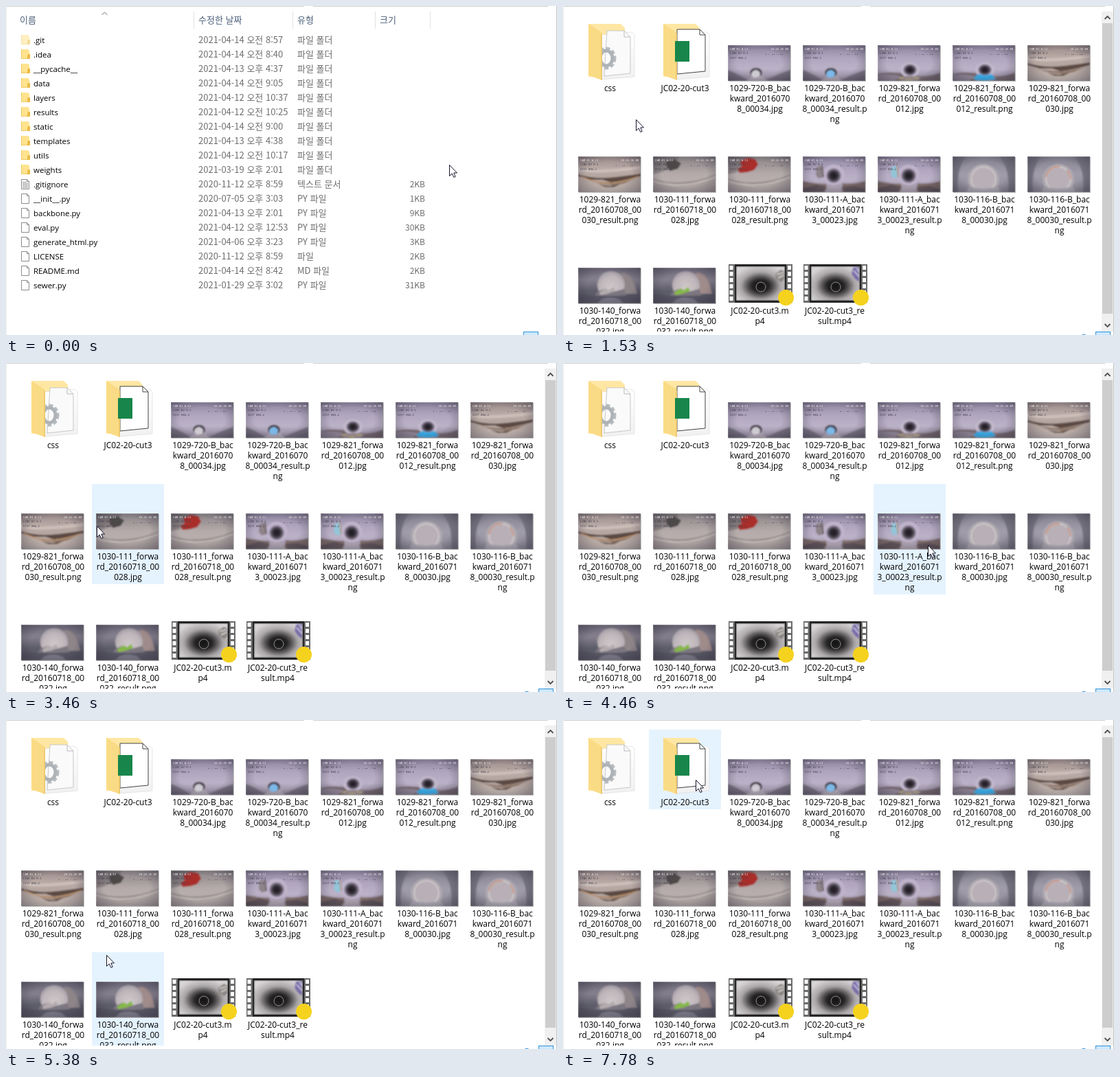
Recreate the animation shown at these times as an HTML page. Size 802 px wide and 479 px high, loop 8000 ms.

```html
<!DOCTYPE html>
<html lang="ko">
<head>
<meta charset="utf-8">
<title>File explorer</title>
<style>
  html, body { margin: 0; width: 100%; height: 100%; overflow: hidden; background: #fff; }
  #stage { display: block; width: 100vw; height: 100vh; }
  text { white-space: pre; }
  .name { font: 11.5px "Open Sans", "Noto Sans", sans-serif; }
  .label { font: 12px "Open Sans", "Noto Sans", sans-serif; text-anchor: middle; }
  .cell { font: 13px "Noto Sans CJK KR", "Noto Sans CJK", sans-serif; fill: #6d6d6d; }
  .head { fill: #4c607a; }
  .size { font-size: 12px; text-anchor: end; }
  .osd { font: 4px "Noto Sans Mono", monospace; }
</style>
</head>
<body>
<svg id="stage" viewBox="0 0 802 479"></svg>
<script>
const LOOP = 8000, TICK = 76.9;
const stage = document.getElementById('stage');

// ---- small markup helpers ----
const rect = (x, y, w, h, fill, extra = '') =>
  `<rect x="${x}" y="${y}" width="${w}" height="${h}" fill="${fill}" ${extra}/>`;
const path = (d, fill, extra = '') => `<path d="${d}" fill="${fill}" ${extra}/>`;
const line = (d, stroke, width = 1) => path(d, 'none', `stroke="${stroke}" stroke-width="${width}"`);
const oval = (x, y, rx, ry, fill, extra = '') =>
  `<ellipse cx="${x}" cy="${y}" rx="${rx}" ry="${ry}" fill="${fill}" ${extra}/>`;
const text = (x, y, cls, s, extra = '') => `<text x="${x}" y="${y}" class="${cls}" ${extra}>${s}</text>`;
const at = (x, y, body) => `<g transform="translate(${x} ${y})">${body}</g>`;
const radial = (id, cx, cy, r, stops) =>
  `<radialGradient id="${id}" cx="${cx}" cy="${cy}" r="${r}">${stops.map(([o, c]) =>
    `<stop offset="${o}" stop-color="${c}"/>`).join('')}</radialGradient>`;
const linear = (id, ...colors) =>
  `<linearGradient id="${id}" x2="0" y2="1">${colors.map((c, i) =>
    `<stop offset="${i / (colors.length - 1)}" stop-color="${c}"/>`).join('')}</linearGradient>`;

const defs = '<defs>' +
  linear('lilac', '#8c839d', '#aea4bd', '#bcb2c8', '#8a8194') +
  linear('sand', '#998a88', '#baaaa6', '#b3a5a0', '#c2b6b0') +
  linear('clay', '#8a8386', '#b5abaa', '#bcb2b1') +
  linear('stone', '#84818f', '#a19dab', '#8d8a97') +
  linear('dusk', '#6f6a7a', '#85808d', '#5c5b68', '#666573') +
  linear('page', '#ffffff', '#f1f1f1') +
  radial('shade', .5, .5, .72, [[.5, '#2d293800'], [1, '#2d293880']]) +
  radial('hole', .5, .5, .5, [[0, '#1d1a20'], [.5, '#332e37'], [.8, '#6c6474'], [1, '#a79db3']]) +
  radial('mouth', .5, .6, .6, [[0, '#d0c9ca'], [.7, '#bdb5b9'], [1, '#a19aa3']]) +
  radial('pipe', .5, .57, .62, [[0, '#151515'], [.28, '#242324'], [.45, '#5d5a5c'], [.65, '#aaa6a8'], [1, '#d9d6d8']]) +
  '<filter id="soft" x="0" y="0" width="1" height="1"><feGaussianBlur stdDeviation=".8"/></filter></defs>';

// ---- list view ----
const files = `.git|04-14 오전 8:57
.idea|04-14 오전 8:40
__pycache__|04-13 오후 4:37
data|04-14 오전 9:05
layers|04-12 오전 10:37
results|04-12 오전 10:25
static|04-14 오전 9:00
templates|04-13 오후 4:38
utils|04-12 오전 10:17
weights|03-19 오후 2:01
.gitignore|2020-11-12 오후 8:59|텍스트 문서|2KB
__init__.py|2020-07-05 오후 3:03|PY 파일|1KB
backbone.py|04-13 오후 2:01|PY 파일|9KB
eval.py|04-12 오후 12:53|PY 파일|30KB
generate_html.py|04-06 오후 3:23|PY 파일|3KB
LICENSE|2020-11-12 오후 8:59|파일|2KB
README.md|04-14 오전 8:42|MD 파일|2KB
sewer.py|01-29 오후 3:02|PY 파일|31KB`.split('\n').map(row => row.split('|'));

const smallFolder = path('M0 0H10L12 2V14H0Z', '#ffe38f') + path('M0 0H1V14H0ZM0 13H12V14H0Z', '#efc964') +
  path('M10 7H13V14H9V10Z', '#eabb45');
const smallPage = path('M.5 .5H8.5L11.5 3.5V14.5H.5Z', '#fff', 'stroke="#8c8c8c"') +
  line('M8.5 .5V3.5H11.5', '#8c8c8c');
const pageLines = line('M2 4.5H8M2 6.5H10M2 8.5H10M2 10.5H10M2 12.5H10', '#999');

const fileRow = ([name, date, type, size], i) => {
  const y = 39 + 21 * i;
  const icon = !type ? smallFolder : smallPage + (name === '.gitignore' ? pageLines : '');
  return `<g ${i ? '' : 'opacity=".55"'}>${at(22, y + 3, icon)}</g>` +
    text(40, y + 15, 'name', name) +
    text(280, y + 15, 'cell', date.startsWith('2020') ? date : '2021-' + date) +
    text(424, y + 15, 'cell', type || '파일 폴더') +
    text(610, y + 15, 'cell size', size || '');
};
const headings = [[20, '이름'], [280, '수정한 날짜'], [424, '유형'], [544, '크기']];
const listView = headings.map(([x, s]) => text(x, 25, 'cell head', s)).join('') +
  [273, 417, 537, 617].map(x => rect(x, 8, 1, 25, '#e2e2e2')).join('') +
  line('M139.5 13L143.5 9L147.5 13', '#6d6d6d') +
  files.map(fileRow).join('') +
  rect(753.5, 474.5, 21, 8, '#cce8ff', 'stroke="#3192d6"');

// ---- thumbnails, drawn in a 91 x 52 box ----
const osd = text(3, 7, 'osd', 'CAM 01 A:12', 'fill="#eee"') + text(62, 7, 'osd', '10:24:36 08', 'fill="#eee"') +
  `<g fill="#47424f">${text(3, 13, 'osd', 'LINE 02 B:3')}${text(3, 20, 'osd', 'DIST 004-2')}
  ${text(54, 15, 'osd', '▪ ◦ ▪▪ ◦ ▪▪')}</g>`;

const scenes = {
  debris: marked => rect(0, 0, 91, 52, 'url(#lilac)') +
    path('M0 36Q16 42 30 52H0ZM91 36Q70 43 54 52H91Z', '#5d5967', 'opacity=".6"') +
    path('M27 52Q34 42 50 44L56 52Z', '#aaa1ae') +
    oval(41, 40, 9, 7, '#4a4550') +
    path('M34 44Q34 37 41 36Q49 38 46 46L38 48Z', marked ? '#7db9e8' : '#cfcbd3'),
  silt: marked => rect(0, 0, 91, 52, 'url(#lilac)') +
    path('M0 42Q22 37 46 43T91 40V52H0Z', '#75676e') +
    path('M0 43Q20 41 34 46L24 52H0Z', '#928798') +
    oval(47, 36, 14, 11, '#c3b9cd') + oval(47, 36, 10, 8.5, 'url(#hole)') +
    path('M32 47Q46 42 64 47L58 52H34Z', '#978a90') +
    line('M30 49L38 47M52 48L60 48M40 50H50', '#bfae72', 1.5) +
    (marked ? path('M30 48L38 42L48 44L57 42L63 50L46 52L34 51Z', '#37a7e0') : ''),
  crack: marked => rect(0, 0, 91, 52, 'url(#sand)') +
    line('M0 19Q30 25 91 16', '#cdc0ba', 4) +
    path('M0 26Q22 33 44 31T91 25V29Q66 36 48 38L36 34L18 34L0 29Z', '#5c4a43') +
    path('M14 34Q30 38 46 38T82 32L68 39L52 42L32 40Z', '#8d7567') +
    path('M30 41L46 43L62 40L52 45L40 45Z', '#66544c') +
    (marked ? line('M4 29Q28 40 46 39T88 29', '#cd9b66', 1.2) : ''),
  stain: marked => rect(0, 0, 91, 52, 'url(#clay)') +
    path('M0 0H38Q30 16 12 23L0 26Z', '#686264', 'opacity=".5"') +
    path('M0 34Q42 47 91 28V52H0Z', '#aaa09f') + line('M0 33Q42 47 91 27', '#857b7c', 1.3) +
    line('M0 36Q42 50 91 30', '#cbc2c0', 1.5) +
    path(marked ? 'M18 7L28 2L40 4L44 12L38 20L28 23L17 24L14 18L20 15Z' : 'M19 8L31 4L41 10L36 18L25 21L20 16Z',
      marked ? '#a92e2c' : '#4d484a'),
  joint: marked => rect(0, 0, 91, 52, 'url(#lilac)') +
    path('M0 36Q18 40 34 40L36 52H0ZM91 36Q74 41 58 39L56 52H91Z', '#7d6a68') +
    path('M0 47L20 41L34 44L30 52H0ZM91 48L75 43L58 44L60 52H91Z', '#5f5358') +
    path('M32 52L38 40H52L58 52Z', '#a69caa') +
    oval(45, 27, 16, 15, '#bfb4cb') + oval(45, 28, 11, 11, 'url(#hole)') +
    path('M20 15L29 13L31 30L23 32L19 27Z', marked ? '#93c4d8' : '#8d8288') +
    line('M28 13L30 30', marked ? '#c08058' : '#5c545a', 1.5),
  ring: marked => rect(0, 0, 91, 52, 'url(#stone)') +
    path('M0 0H20Q5 17 8 52H0ZM91 0H68Q84 18 81 52H91Z', '#777582') +
    oval(45, 33, 23, 22, '#aea8b0') + oval(45, 33, 18, 18, '#b8b0b6') +
    oval(45, 33, 18, 18, 'none', 'stroke="#d6d0d1" stroke-width="1.5"') +
    path('M24 44Q45 50 66 44L70 52H20Z', '#a7a4ae') +
    (marked ? line('M27 30Q31 14 47 15M58 20Q62 26 63 33', '#d28058', 1.2) : ''),
  outlet: marked => rect(0, 0, 91, 52, 'url(#dusk)') +
    path('M62 8Q75 5 82 23L86 38H64Z', marked ? '#a08b8b' : '#8e8589') +
    oval(48, 25, 20, 20, 'url(#mouth)') +
    path('M28 35L38 31L52 35L67 31L72 42H24Z', '#7c7680') +
    path('M0 38Q45 45 91 37V52H0Z', '#565562') + path('M34 46Q45 41 60 46L66 52H28Z', '#777684') +
    path('M31 36L40 30L45 33L51 28L54 34L43 38L32 40Z', marked ? '#86b847' : '#b3acaf'),
};
const lettered = ['debris', 'silt', 'crack', 'stain', 'joint'];
const thumb = (scene, marked) => rect(7, 44, 91, 52, '#bdbdbd') +
  `<svg x="6" y="43" width="91" height="52"><g filter="url(#soft)">${scenes[scene](marked)}</g>` +
  rect(0, 0, 91, 52, 'url(#shade)') + (lettered.includes(scene) ? osd : '') + '</svg>';

const video = (_, marked) => {
  const holes = [...Array(6)].map((_, i) =>
    rect(8.5, 40 + 9 * i, 5, 6, '#fff') + rect(93, 40 + 9 * i, 5, 6, '#fff')).join('');
  const junk = marked
    ? path('M79 43L88 41V64L82 59L77 52Z', '#786ca8') + line('M80 47L88 56M84 43L88 49', '#d8d4e8', 1.5)
    : path('M75 52L83 46L88 48V60L84 64L76 59Z', '#8a8580') + line('M77 53L87 50M79 58L87 54', '#ddd', 1.5);
  return rect(7, 38, 93, 56, '#6b6b6b') + holes + rect(16, 38, 75, 56, '#252525') +
    `<g filter="url(#soft)">${rect(18, 41, 71, 50, 'url(#pipe)')}${junk}</g>` +
    oval(54, 71, 7, 7, 'none', 'stroke="#96908f"') + oval(90.5, 86.5, 11.5, 11.5, '#f5d21d');
};

const bigFolder = sheet =>
  path('M21 12H68L74 18V89H21Z', '#ffe7a3') +
  path('M40 28L84 24L88 28V89L40 93Z', 'url(#page)', 'stroke="#ddd" stroke-width=".7"') +
  sheet + path('M21 12L38 23Q41 25 41 29V94L21 87Z', '#fadb85') + path('M39 25L41 29V94L39 93Z', '#eecb70');
const gear = oval(47, 62, 11, 13, 'none', 'stroke="#b8bcc0" stroke-width="7" stroke-dasharray="5 3"') +
  oval(47, 62, 9, 11, 'none', 'stroke="#aeb3b7" stroke-width="5"');
const cssFolder = () => bigFolder(
  path('M48 22H73L82 31V84L44 88Z', '#fafafa', 'stroke="#bbb" stroke-width=".8"') + line('M73 22V31H82', '#bbb') + gear);
const sheetFolder = () => bigFolder(
  path('M41 20H74L82 28V81L41 85Z', '#fff', 'stroke="#444"') + line('M74 20V28H82', '#444')) +
  rect(38, 37, 21, 30, '#18864b');

// ---- icon view ----
const items = [
  ['css', cssFolder], ['JC02-20-cut3', sheetFolder],
  ['1029-720-B_bac|kward_2016070|8_00034.jpg', thumb, 'debris'],
  ['1029-720-B_bac|kward_2016070|8_00034_result.p|ng', thumb, 'debris', 1],
  ['1029-821_forwa|rd_20160708_00|012.jpg', thumb, 'silt'],
  ['1029-821_forwa|rd_20160708_00|012_result.png', thumb, 'silt', 1],
  ['1029-821_forwa|rd_20160708_00|030.jpg', thumb, 'crack'],
  ['1029-821_forwa|rd_20160708_00|030_result.png', thumb, 'crack', 1],
  ['1030-111_forwa|rd_20160718_00|028.jpg', thumb, 'stain'],
  ['1030-111_forwa|rd_20160718_00|028_result.png', thumb, 'stain', 1],
  ['1030-111-A_bac|kward_2016071|3_00023.jpg', thumb, 'joint'],
  ['1030-111-A_bac|kward_2016071|3_00023_result.p|ng', thumb, 'joint', 1],
  ['1030-116-B_bac|kward_2016071|8_00030.jpg', thumb, 'ring'],
  ['1030-116-B_bac|kward_2016071|8_00030_result.p|ng', thumb, 'ring', 1],
  ['1030-140_forwa|rd_20160718_00|032.jpg', thumb, 'outlet'],
  ['1030-140_forwa|rd_20160718_00|032_result.png', thumb, 'outlet', 1],
  ['JC02-20-cut3.m|p4', video], ['JC02-20-cut3_re|sult.mp4', video, '', 1],
].map(([label, draw, scene, marked], i) => {
  const lines = label.split('|'), x = 16 + 109 * (i % 7), y = 14 + 162 * Math.floor(i / 7);
  return { lines, x, y, w: 105, h: Math.min(101 + 15 * lines.length, 474 - y), art: draw(scene, marked) };
});
const itemMarkup = ({ lines, x, y, art }) => at(x, y, art +
  lines.map((s, i) => text(52.5, 110 + 15 * i, 'label', s)).join(''));

const scrollbar = rect(784, 8, 17, 466, '#f0f0f0') + rect(785, 25, 15, 423, '#cdcdcd') +
  line('M788.5 19L792.5 15L796.5 19M788.5 463L792.5 467L796.5 463', '#505050', 1.8);
const iconChrome = scrollbar + rect(775.5, 474.5, 21, 8, '#cce8ff', 'stroke="#3192d6"') +
  oval(758, 481, 4, 3, '#3192d6');

stage.innerHTML = defs + rect(0, 0, 802, 479, '#fff') +
  rect(0, 0, 434, 1, '#cfcfcf') + rect(447, 0, 342, 1, '#cfcfcf') +
  rect(0, 0, 1, 479, '#ededed') + rect(801, 0, 1, 479, '#c4c4c4') +
  rect(0, 0, 0, 0, '#e5f3ff', 'id="hover"') +
  `<g id="list">${listView}</g><g id="icons">${iconChrome}
    <svg id="grid" width="784" height="474">${items.map(itemMarkup).join('')}</svg></g>` +
  `<g id="cursor">${path('M.5 .5V16.5L4.2 13L6.8 18.5L9.2 17.5L6.8 12H11.5Z', '#fff', 'stroke="#15152b"')}</g>`;

const [hover, list, icons, grid, cursor] =
  ['hover', 'list', 'icons', 'grid', 'cursor'].map(id => document.getElementById(id));

// ---- motion: [tick, x, y] ----
const route = [
  [0, 645, 231], [2, 520, 216], [5, 180, 182], [7, 92, 177], [19, 92, 177], [20, 106, 165],
  [25, 380, 122], [30, 614, 110], [34, 700, 104], [35, 700, 104], [46, 75, 250], [57, 500, 262],
  [58, 531, 265], [61, 700, 270], [62, 690, 272], [68, 270, 295], [70, 146, 342], [72, 80, 400],
  [76, 338, 420], [79, 150, 425], [81, 70, 425], [86, 376, 423], [90, 469, 420], [91, 471, 418],
  [94, 400, 360], [97, 300, 220], [101, 193, 87], [200, 193, 87],
];
const rowBoxes = files.map((_, i) => ({ x: 16, y: 39 + 21 * i, w: 601, h: 21 }));
const SELECT = 12, OPEN = 13, READY = 16;

function pointer(tick) {
  const i = route.findIndex(key => key[0] > tick);
  const [t0, x0, y0] = route[i - 1], [t1, x1, y1] = route[i];
  const k = (tick - t0) / (t1 - t0);
  return [Math.round(x0 + (x1 - x0) * k), Math.round(y0 + (y1 - y0) * k)];
}

function draw() {
  const tick = Math.floor((performance.now() % LOOP + 12) / TICK);
  const [px, py] = pointer(tick);
  const opened = tick >= OPEN;
  list.style.display = opened ? 'none' : '';
  icons.style.display = opened ? '' : 'none';
  grid.style.opacity = Math.min(1, Math.max(0, (tick - OPEN) / 2));

  // The first frame shows the pointer at rest, right of the columns.
  const boxes = !opened ? rowBoxes : tick < READY ? [] : items;
  const hit = boxes.find(b => px >= b.x && px < b.x + b.w && py >= b.y && py < b.y + b.h);
  const { x, y, w, h } = hit || { x: 0, y: 0, w: 0, h: 0 };
  Object.entries({ x, y, width: w, height: h, fill: tick === SELECT ? '#cce8ff' : '#e5f3ff' })
    .forEach(([key, value]) => hover.setAttribute(key, value));
  cursor.setAttribute('transform', `translate(${px} ${py})`);
  requestAnimationFrame(draw);
}
draw();
</script>
</body>
</html>
```
